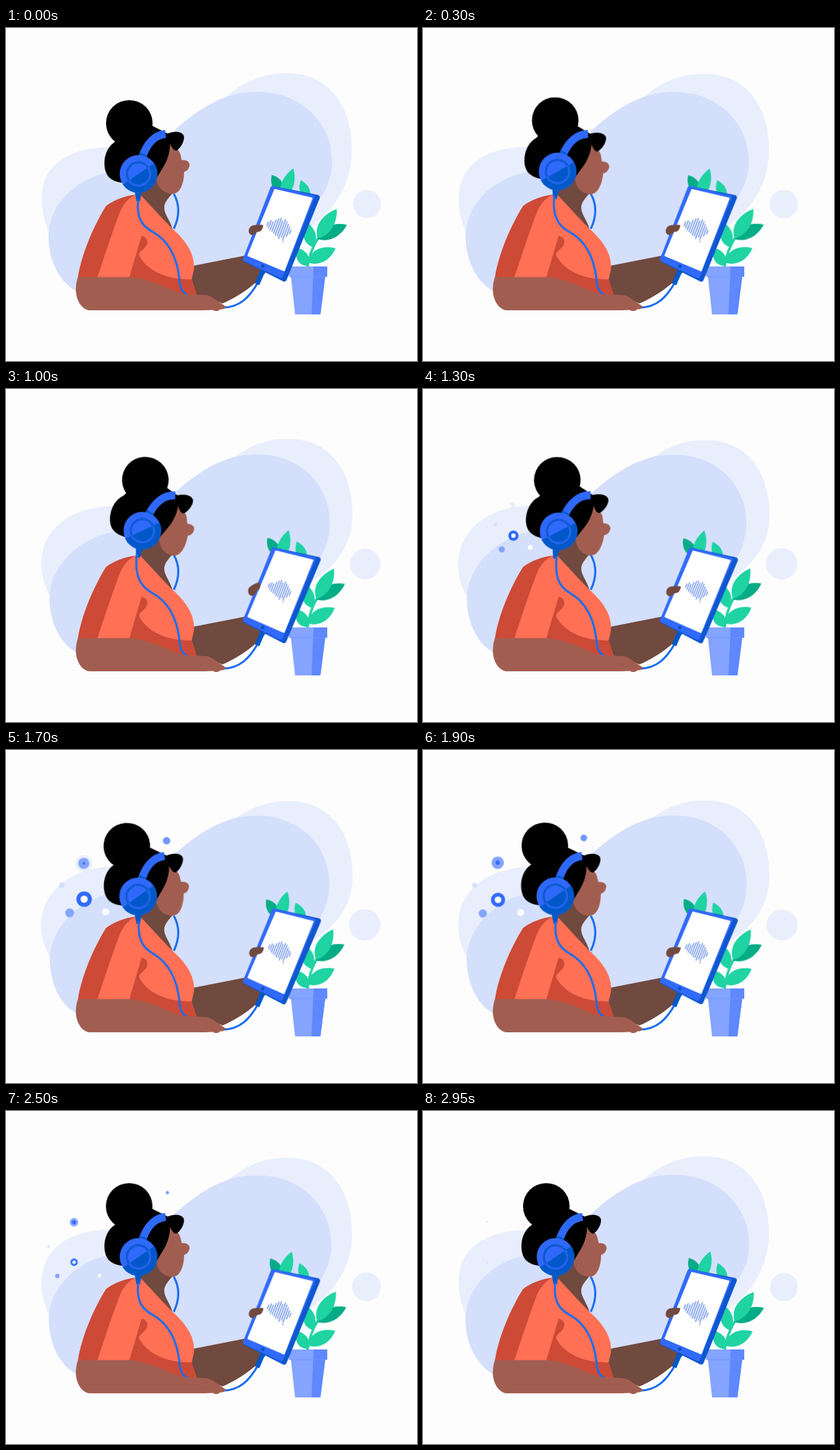
Recreate the animation shown at these times as an HTML page without scripts. Size 600x486 px, loop 3000 ms.

```html
<!DOCTYPE html>
<html lang="en">
<head>
<meta charset="utf-8">
<title>Listening</title>
<style>
  html, body { margin: 0; width: 100%; height: 100%; overflow: hidden; background: #fdfdfd; }
  svg { display: block; width: 600px; height: 486px; }

  .sway, .blob, .moon { animation: 3s cubic-bezier(.364, 0, .636, 1) infinite; }
  .back { animation-name: back; }
  .front { animation-name: front; }
  .moon { animation-name: moon; }
  .plant { animation-name: plant; transform-origin: 440px 347px; }
  .tablet { animation-name: tablet; transform-origin: 346px 337px; }
  .wave { animation-name: wave; }

  .head, .bun, .cord { animation: 3s cubic-bezier(.364, 0, .636, 1) infinite; }
  .head { animation-name: nod; transform-origin: 236px 246px; }
  .bun { animation-name: bun; transform-origin: 182px 172px; }
  .cord { animation-name: cord; }
  .thumb { animation: tap 3s ease-in-out infinite; transform-origin: 358px 299px; }

  .drift { animation: drift 3s linear infinite; }
  .drift circle { r: 0; animation: pop 3s linear infinite; }

  @keyframes back {
    0%, 100% { d: path("M66 305C54 280 50 257 53 237C58 196 98 174 150 174L250 165C300 128 332 66 410 66C472 66 505 114 505 178C505 226 481 264 445 290L300 330L100 330Z"); }
    50% { d: path("M66 305C53 286 49 263 52 245C58 202 100 171 155 170L250 165C312 128 340 75 412 75C474 75 506 122 506 184C506 226 484 256 445 280L300 330L100 330Z"); }
  }
  @keyframes front {
    0%, 100% { d: path("M106 386C78 372 62 340 62 303C63 254 108 209 180 207C222 205 232 160 252 144C292 110 326 93 366 93C430 93 476 137 476 195C476 225 460 252 440 270L350 335L275 350L200 370Z"); }
    50% { d: path("M106 386C80 374 64 342 64 303C66 258 112 208 180 205C222 205 232 162 252 147C292 113 326 96 366 96C428 96 472 139 472 197C472 225 458 252 440 270L350 335L275 350L200 370Z"); }
  }
  @keyframes moon {
    0%, 100% { r: 20.5px; transform: none; }
    50% { r: 23px; transform: translate(-3.5px, -2px); }
  }
  @keyframes plant { 50% { transform: rotate(-3.7deg); } }
  @keyframes tablet { 50% { transform: rotate(1.15deg); } }
  @keyframes wave { 50% { transform: scale(.92, .88); } }
  @keyframes nod {
    0%, 100% { transform: rotate(0deg); }
    18% { transform: rotate(8.4deg); }
    35% { transform: rotate(8.9deg); }
    43.33% { transform: rotate(7.3deg); }
    56% { transform: rotate(-1deg); }
    72% { transform: rotate(0deg); }
  }
  @keyframes bun {
    0%, 100% { transform: rotate(0deg); }
    18% { transform: rotate(10.5deg); }
    35% { transform: rotate(11deg); }
    43.33% { transform: rotate(3.5deg); }
    56% { transform: rotate(-3deg); }
    72% { transform: rotate(-.5deg); }
  }
  @keyframes cord {
    0%, 72%, 100% { d: path("M193 250C190 277 198 289 215 298C241 313 250 340 253 365C254 378 256 386 266 390"); }
    18%, 35% { d: path("M191 241C187 272 196 288 214 298C241 313 250 340 253 365C254 378 256 386 266 390"); }
    43.33% { d: path("M195 245C192 275 199 289 215 298C241 313 250 340 253 365C254 378 256 386 266 390"); }
    56% { d: path("M194 250C192 277 200 289 216 298C241 313 250 340 253 365C254 378 256 386 266 390"); }
  }
  @keyframes tap {
    0%, 25%, 41%, 100% { transform: rotate(0deg); }
    33% { transform: rotate(-24deg); }
  }
  @keyframes drift {
    0%, 37% { transform: translate(calc(var(--x) * 1.35), calc(var(--y) * 1.35)); }
    43.33% { transform: translate(var(--x), var(--y)); }
    56.67% { transform: translate(calc(var(--x) * .54), calc(var(--y) * .54)); }
    71.67% { transform: translate(calc(var(--x) * .28), calc(var(--y) * .28)); }
    100% { transform: none; }
  }
  @keyframes pop {
    0%, 37%, 100% { r: 0px; }
    43.33% { r: var(--a); }
    56.67% { r: var(--b); }
    71.67% { r: var(--c); }
  }
</style>
</head>
<body>
<svg viewBox="0 0 600 486">
  <defs>
    <path id="leaf" d="M0 0C-17 -12 -14 -34 0 -50C13 -35 15 -13 0 0Z"/>
  </defs>

  <!-- backdrop -->
  <path class="blob back" fill="#e8eefc" d="M66 305C54 280 50 257 53 237C58 196 98 174 150 174L250 165C300 128 332 66 410 66C472 66 505 114 505 178C505 226 481 264 445 290L300 330L100 330Z"/>
  <path class="blob front" fill="#d4dffc" d="M106 386C78 372 62 340 62 303C63 254 108 209 180 207C222 205 232 160 252 144C292 110 326 93 366 93C430 93 476 137 476 195C476 225 460 252 440 270L350 335L275 350L200 370Z"/>
  <circle class="moon" cx="527" cy="257" r="20.5" fill="#e8eefc"/>

  <!-- bubbles -->
  <g class="drift" style="--x:39px;--y:-8px">
    <circle cx="93" cy="222" fill="#316afb" style="--a:7.5px;--b:11.3px;--c:9.2px"/>
    <circle cx="93" cy="222" fill="#fdfdfd" style="--a:3.2px;--b:5.3px;--c:4.3px"/>
  </g>
  <g class="drift" style="--x:38px;--y:8px">
    <circle cx="93" cy="161" fill="#e8eefc" style="--a:3.5px;--b:12px;--c:0px"/>
    <circle cx="93" cy="161" fill="#85a4ff" style="--a:0px;--b:8px;--c:10.5px"/>
    <circle cx="93" cy="161" fill="#316afb" style="--a:0px;--b:1.8px;--c:4.8px"/>
  </g>
  <g class="drift" style="--x:48px;--y:-8px">
    <circle cx="67" cy="242" fill="#85a4ff" style="--a:4.5px;--b:6.5px;--c:5.4px"/>
  </g>
  <g class="drift" style="--x:24px;--y:-11px">
    <circle cx="132.5" cy="242" fill="#fdfdfd" style="--a:3.6px;--b:5.3px;--c:4.4px"/>
  </g>
  <g class="drift" style="--x:53px;--y:0px">
    <circle cx="53" cy="197.5" fill="#d4dffc" style="--a:2.5px;--b:4px;--c:3.2px"/>
  </g>
  <g class="drift" style="--x:-3px;--y:35px">
    <circle cx="236" cy="113.5" fill="#7398fc" style="--a:0px;--b:5.4px;--c:4.2px"/>
  </g>

  <!-- plant -->
  <g class="sway plant" fill="#1fd3a3">
    <path d="M440 350Q443 325 458 303" fill="none" stroke="#1fd3a3" stroke-width="3.5"/>
    <use href="#leaf" transform="translate(404 241) rotate(-31) scale(.7 .62)" fill="#05ac86"/>
    <use href="#leaf" transform="translate(404 250) rotate(19) scale(.8 .95)"/>
    <use href="#leaf" transform="translate(442 251) rotate(-22) scale(.65 .62)"/>
    <use href="#leaf" transform="translate(448 320) rotate(-14) scale(.8 .75)"/>
    <use href="#leaf" transform="translate(455 308) rotate(64) scale(.85 .95)" fill="#05ac86"/>
    <use href="#leaf" transform="translate(455 307) rotate(33) scale(.9 1.02)"/>
    <use href="#leaf" transform="translate(441 342) rotate(63) scale(.9)"/>
    <use href="#leaf" transform="translate(441 347) rotate(-32) scale(.75 .62)"/>
  </g>
  <path fill="#85a4ff" d="M413 348H469V363H466L459 418H422L416 363H413Z"/>
  <path fill="#5f88ff" d="M449 348H469V363H466L459 418H446Z"/>
  <path d="M415 363H467" stroke="#6f93fb" stroke-width="1.2"/>

  <!-- far arm and tablet -->
  <path fill="none" stroke="#1a6df0" stroke-width="3" d="M245 242C254 258 253 276 245 293"/>
  <path fill="#70493f" d="M258 350L350 332L384 350C372 368 345 390 316 402L296 394L258 392Z"/>
  <path fill="none" stroke="#1a6df0" stroke-width="3" d="M368 371C356 392 342 408 316 408"/>
  <path stroke="#0058c8" stroke-width="7" d="M376 352L366.5 374"/>
  <g class="sway tablet" stroke-linejoin="round">
    <path fill="#0f57d0" stroke="#0f57d0" stroke-width="8" d="M391 235L454 247.500L406 366L350 338Z"/>
    <path fill="#316afb" stroke="#316afb" stroke-width="6" d="M389 233.500L447.500 247L401.500 362L349 337.500Z"/>
    <path fill="#fff" stroke="#fff" stroke-width="2" d="M392.500 236L446.500 248.500L406 354L353.500 332Z"/>
    <circle cx="375" cy="347.500" r="2.600" fill="#0f4fc0"/>
    <g transform="translate(399 292) rotate(20) scale(1.060 1.060)">
      <path class="sway wave" fill="none" stroke="#7397e8" stroke-width="1.500" stroke-linecap="round"
        d="M-17 -3V3M-14 -6V5M-11 -5V7M-8 -9V8M-5 -12V9M-2 -14V11M1 -11V11M4 -14V14M7 -12V11M10 -9V13M13 -6V7M16 -3V3M11 15V16"/>
    </g>
    <path class="thumb" fill="#70493f" d="M375.500 287.500C366 287 359 287 356 291C353 296 354 300 358 302C363 303 364 299 367 297.500C372 298 375 294 375.500 287.500Z"/>
  </g>

  <!-- torso -->
  <path fill="#70493f" d="M191 236L215 200L246 238C238 247 231 254 231 262C231 272 239 279 243 293L225 287L192 248Z"/>
  <path fill="#ff7055" d="M105 365C110 330 129 287 146 260C158 250 180 245 195 242C211 259 229 279 242 292C261 309 276 328 274.500 352L271 367L279 392Z"/>
  <path fill="#cc4a36" d="M105 365C110 330 129 287 146 260C158 250 176 245 189 243C178 249 170 258 165 272C153 304 143 335 133 365Z"/>
  <path fill="#cc4a36" d="M180 364L198 303C206 305 209 312 204 319C199 325 192 328 195 333C205 351 228 367 271 367L279 392L250 389Z"/>

  <!-- head -->
  <g class="head">
    <path fill="#a15e50" d="M238 167L252 179C256 185 255 190 257 193C263 192 268 195 268 200C267 206 264 209 260 210C260 223 256 241 244 242C230 242 219 233 218 210Z"/>
    <ellipse class="bun" cx="180" cy="139" rx="34" ry="33.800"/>
    <path d="M158 167C144 176 140 199 147 213C153 225 170 228 190 226L219 222C225 207 239 196 239.500 169C242 175 245 179 249 179C257 174 262 161 259 156C254 150 244 151 236 154L212 142L180 140Z"/>
    <path fill="none" stroke="#2f69fa" stroke-width="11.500" d="M198.500 190C204 173 213 157 233 154.500"/>
    <path fill="#0058c8" d="M194 188L196 182L206 186L205 190Z"/>
    <path fill="#0058c8" d="M187.500 237H198.500L195.500 253H190.500Z"/>
    <g transform="translate(193.500 213) rotate(-34)" fill="none" stroke-width="3.200">
      <circle r="27.500" fill="#2f69fa"/>
      <path fill="#0058c8" d="M-27.500 0A27.500 27.500 0 0 0 27.500 0Z"/>
      <path stroke="#0f59d2" d="M-17 0A17 17 0 0 1 17 0"/>
      <path stroke="#2363ec" d="M-17 0A17 17 0 0 0 17 0"/>
    </g>
  </g>
  <path class="cord" fill="none" stroke="#1a6df0" stroke-width="3" d="M193 250C190 277 198 289 215 298C241 313 250 340 253 365C254 378 256 386 266 390"/>

  <!-- near arm -->
  <path fill="#a15e50" d="M105 363.500H182C210 366 232 379 256 388L294 390C302 392 310 400 319 405C322 408 319 411 313 410.500C310 413.500 306 414 302 411.500L290 412H122C110 411 102 396 102 382C102 375 103 369 105 363.500Z"/>
</svg>
</body>
</html>
```
